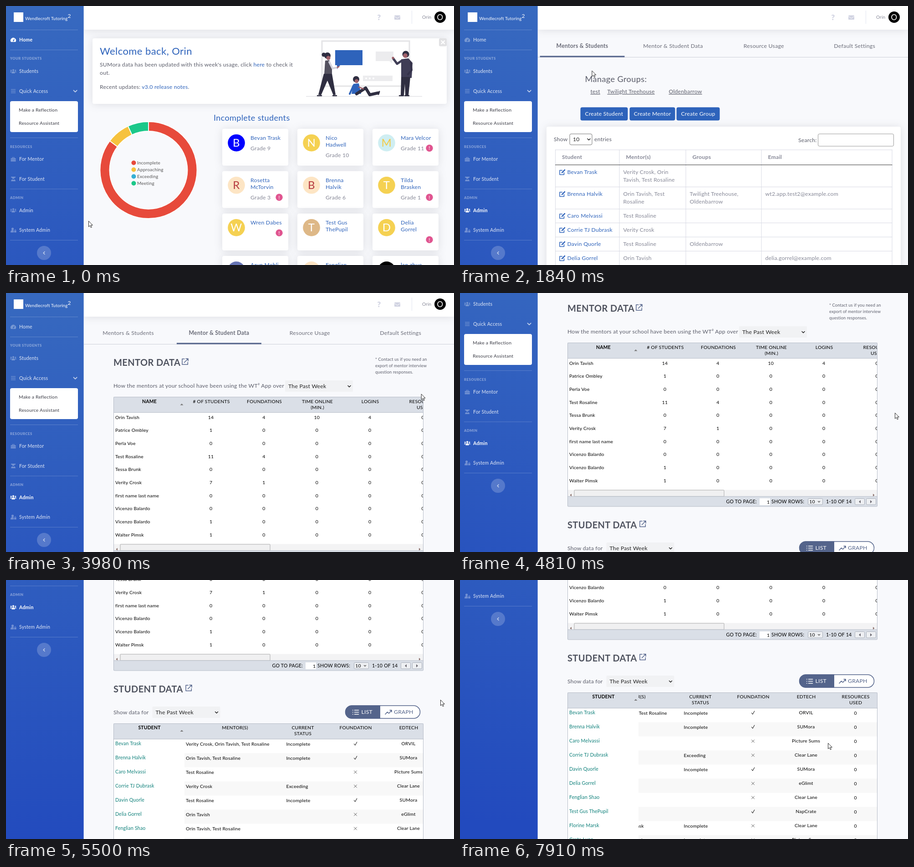
Write an HTML page that moves like this. It is 984 px wide and 569 px high and loops after 8000 ms.

```html
<!DOCTYPE html>
<html lang="en">
<head>
<meta charset="utf-8">
<title>Mentor dashboard</title>
<style>
html, body { margin: 0; width: 100%; height: 100%; overflow: hidden; background: #f8f9fc; }
svg { display: block; width: 984px; height: 569px; }
text { font-family: Lato, sans-serif; letter-spacing: .02em; white-space: pre; }
.mid { text-anchor: middle; }
.bold { font-weight: 700; }
.card { fill: #fff; filter: drop-shadow(0 1.5px 9px rgba(58, 59, 69, .14)); }
.head { font-weight: 900; letter-spacing: .07em; }
.nav text { opacity: .86; }
.nav g { opacity: .32; }
.nav.hot text, .nav.on text, .nav.on g { opacity: 1; }
.nav.on text { font-weight: 700; }
.line { fill: none; stroke-linecap: round; stroke-linejoin: round; }
.modal { fill: #fff; filter: drop-shadow(2px 2px 2px #334); }
.loading { font: 700 22.2px "Liberation Sans", Arial, sans-serif; letter-spacing: 0; }
</style>
</head>
<body>
<svg id="stage" viewBox="0 0 984 569"></svg>
<script>
const BLUE = '#2e63bb', GRAY = '#5a5c69', SOFT = '#858796', SLATE = '#54648b';
const $ = id => document.getElementById(id);
const list = (items, fn) => items.map(fn).join('');
const range = n => [...Array(n).keys()];

const txt = (x, y, s, size = 12.2, fill = GRAY, cls = '', more = '') =>
  `<text x="${x}" y="${y}" font-size="${size}" fill="${fill}" class="${cls}" ${more}>${s}</text>`;
const box = (x, y, w, h, fill, r = 0, more = '') =>
  `<rect x="${x}" y="${y}" width="${w}" height="${h}" fill="${fill}" rx="${r}" ${more}/>`;
const card = (x, y, w, h) => box(x, y, w, h, '#fff', 4, 'class="card"');
const dot = (x, y, r, fill) => `<circle cx="${x}" cy="${y}" r="${r}" fill="${fill}"/>`;
const path = (d, fill) => `<path d="${d}" fill="${fill}"/>`;
const line = (d, stroke, w = 1) => `<path class="line" d="${d}" stroke="${stroke}" stroke-width="${w}"/>`;
const at = (x, y, s) => `<g transform="translate(${x} ${y})">${s}</g>`;
const group = (id, s) => `<g id="${id}">${s}</g>`;

// sidebar
const PEOPLE = '<circle cy="-2.6" r="2.1"/><circle cx="-4.8" cy="-2" r="1.5"/><circle cx="4.8" cy="-2" r="1.5"/>' +
  '<path d="M-3.6 4.5V3a3.6 3 0 0 1 7.2 0v1.5zM-6.6 2.6v-1a2 2 0 0 1 3-1.3l-1 2.3zM6.6 2.6v-1a2 2 0 0 0-3-1.3l1 2.3z"/>';
const USER = '<circle cx="-1.5" cy="-2.8" r="2.6"/><path d="M-6 5V3.5a4 4 0 0 1 7-2.5V5z"/>';
const LOCK = '<path d="M2 1h4.6v4H2zM2.8 1v-1.6a1.5 1.5 0 0 1 3 0V1H5v-1.4a.7.7 0 0 0-1.4 0V1z"/>';
const NAV = [
  [74.5, 'Home', '<path fill-rule="evenodd" d="M-5 4.6A6 6 0 1 1 5 4.6zM-1.4 3h2.8L2.6-2.6 2-2.8z"/>'],
  [143.5, 'Students', PEOPLE],
  [187, 'Quick Access', '<path d="M-5-4.3H5v1.4H-5zM-5-.7H5V.7H-5zM-5 2.9H5v1.4H-5z"/>'],
  [336.5, 'For Mentor', '<path fill-rule="evenodd" d="M-5.5-2H-2.5v-2.6h5V-2h3v3h-11zM-1.3-2h2.6v-1.4h-2.6zM-5.5 1.8h11V5h-11z"/>'],
  [380, 'For Student', '<path d="M-5-5H5v2H2.8a2.8 2.8 0 0 1-5.6 0H-5zM-4.8 5V3.5a4 4 0 0 1 3-2.8L0 2.5 1.8.7a4 4 0 0 1 3 2.8V5z"/>'],
  [449, 'Admin', PEOPLE],
  [492.5, 'System Admin', USER + LOCK]
];
const sidebar = () =>
  box(0, 0, 170.6, 1100, 'url(#blue)') +
  box(17, 14, 21, 21, '#fff') +
  txt(42, 30.5, 'Wendlecroft Tutoring', 9.6, '#fff') + txt(135.5, 25.5, '2', 12, '#fff') +
  list([52.5, 96.5, 289.5, 402, 514.5], y => box(9, y - .5, 149, 1, 'rgba(255,255,255,.2)')) +
  list([[118, 'YOUR STUDENTS'], [311.7, 'RESOURCES'], [423.5, 'ADMIN']],
    ([y, s]) => txt(9, y, s, 7.6, 'rgba(255,255,255,.42)', 'head')) +
  list(NAV, ([y, s, icon], i) =>
    `<g class="nav" id="nav${i}" fill="#fff">${at(16, y, icon)}${txt(29, y + 3.6, s, 10.5, '#fff')}</g>`) +
  line('M148.5 185.3l3.6 3.6 3.6-3.6', '#c3d1ec', 1.8) +
  box(9, 209, 149, 68, '#fff', 4) +
  txt(28, 232, 'Make a Reflection', 10.4, '#3a3b45') + txt(28, 260.6, 'Resource Assistant', 10.4, '#3a3b45') +
  dot(83.5, 542.5, 15.5, 'rgba(255,255,255,.2)') + line('M85 539.7l-2.9 2.9 2.9 2.9', '#c3d1ec', 1.5);

// dx is the width the missing scrollbar gives back
const topbar = dx => box(171, 0, 813, 52, '#fff', 0, 'class="card"') + at(dx, 0,
  txt(819.5, 31, '?', 17, '#d1d3e2', 'mid', 'font-weight="900"') +
  box(853, 20.5, 13, 9.5, '#d1d3e2', 1.5) + line('M853.5 23l6 4 6-4', '#fff', 1) +
  box(891, 10, 1, 29, '#e3e6f0') + txt(914, 28.2, 'Orin', 10, SOFT) +
  dot(953.5, 24.5, 12.5, '#000') + txt(953.6, 30.6, 'O', 17, '#fff', 'mid'));

// home
const ring = (a, b, fill) => {
  const p = (r, deg) => {
    const q = deg * Math.PI / 180;
    return `${313 + r * Math.sin(q)} ${360.5 - r * Math.cos(q)}`;
  };
  const big = b - a > 180 ? 1 : 0;
  return `<path d="M${p(106.5, a)}A106.5 106.5 0 ${big} 1 ${p(106.5, b)}L${p(85.5, b)}A85.5 85.5 0 ${big} 0 ${p(85.5, a)}z" fill="${fill}" stroke="#fff" stroke-width="1.8"/>`;
};
const RED = '#e74a3b', YELLOW = '#f6c23e', GREEN = '#1cc88a';
const donut = () => ring(0, 307, RED) + ring(307, 335, YELLOW) + ring(335, 360, GREEN) +
  list([['Incomplete', RED], ['Approaching', YELLOW], ['Exceeding', '#36b0d5'], ['Meeting', GREEN]],
    ([s, c], i) => dot(280.5, 344.5 + 15 * i, 5, c) + txt(288, 348.2 + 15 * i, s, 10, '#555'));

const INK = '#2f2e41', SKIN = '#a0616a', PALE = '#ececee';
const drawing = () =>
  box(694, 77, 192, 99, 'none', 0, 'stroke="#e4e4e6" stroke-width="3"') +
  box(659, 198, 255, 1, '#d8d8dc') +
  path('M723 97h60v33h-49l-7 9v-9h-4z', BLUE) +
  path('M812 100h39v21h-3v5l-6-5h-30z', PALE) + box(784, 153, 65, 12, PALE) +
  list([791, 799, 807], x => dot(x, 159, 2, '#fff')) +
  dot(698, 107, 4.5, INK) + dot(706, 109, 7, INK) + dot(708, 114, 4.5, SKIN) +
  path('M701 120l9-1 6 13 0 18h-17z', '#53515f') + line('M710 123l7 14 11-2', '#d4d4de', 4) + line('M728 135l3-2', SKIN, 3) +
  path('M698 149h18l8 46-5 1-13-32-14 32-6-1z', INK) + line('M684 197h9M718 197h8', INK, 2.5) +
  dot(769, 161, 7, INK) + dot(770, 165, 4.3, SKIN) + path('M763 171l12-1 5 23h-21z', BLUE) + line('M763 175l-8 18', BLUE, 4) +
  line('M770 193l20-13 9 15 18-4', INK, 6.5) + line('M775 178l10 4', SKIN, 2.5) + line('M818 194l2-6', INK, 3) +
  dot(878, 106, 7.5, INK) + dot(877, 109, 5, SKIN) +
  path('M868 117l16-2 9 10-2 33h-23z', '#3f3d56') + line('M868 121l-9 6-8-11', '#3f3d56', 5) + dot(850, 114, 2.6, SKIN) +
  line('M889 124l2 17-8 9', '#34324a', 4) +
  path('M868 156h20l-4 40h-7l-1-25-2 25h-7z', INK) + line('M864 197h9M876 197h9', INK, 2.5);

const GOLD = '#f5d152', CREAM = '#fde5c4', BRICK = '#b63a40';
const PUPILS = [
  ['Bevan Trask', '', 'Grade 9', 0, '#00f', '#fff'],
  ['Nico', 'Hadwell', 'Grade 10', 0, GOLD, '#fff'],
  ['Mara Velcor', '', 'Grade 11', 1, '#cfeef2', '#f2cb4a'],
  ['Rosetta', 'McTorvin', 'Grade 3', 1, CREAM, BRICK],
  ['Brenna', 'Halvik', 'Grade 6', 0, CREAM, BRICK],
  ['Tilda', 'Brasken', 'Grade 1', 1, GOLD, '#fff'],
  ['Wren Dabes', '', '', 1, GOLD, '#fff'],
  ['Test Gus', 'ThePupil', '', 0, '#deb887', '#fff'],
  ['Delia', 'Gorrel', '', 1, GOLD, '#fff'],
  ['Arun Mehli', '', '', 0, '#6674b4', '#fff'],
  ['Fenglian', 'Shao', '', 0, CREAM, BRICK],
  ['lan zhuo', '', '', 0, '#000', '#fff']
];
const pupil = ([a, b, grade, alert, fill, ink], i) => {
  const drop = b ? 15 : 0;
  return at(475 + 165 * (i % 3), 269.7 + 93.1 * Math.floor(i / 3),
    card(0, 0, 145, 81) + dot(31, 31, 18.8, fill) + txt(31, 39.3, a[0], 24, ink, 'mid') +
    txt(62, 24.4, a, 12.2, BLUE) + txt(62, 39.2, b, 12.2, BLUE) + txt(62, 47.6 + drop, grade, 12.2, SOFT) +
    (alert ? dot(125, 42.5 + drop, 7.7, '#e05590') + txt(125.1, 46.8 + drop, '!', 12, '#fff', 'mid') : ''));
};
const home = () => card(190, 71, 778, 144) +
  txt(206, 107.4, 'Welcome back, Orin', 22, BLUE) +
  txt(206, 132.7, `SUMora data has been updated with this week's usage, click <tspan fill="${BLUE}">here</tspan> to check it`) +
  txt(206, 151.2, 'out.') + txt(206, 182.3, `Recent updates: <tspan fill="${BLUE}">v3.0 release notes</tspan>.`) +
  box(951, 71, 17, 17.5, '#e2e2e4', 3) + line('M956.5 76.5l6.5 6.5m0-6.5l-6.5 6.5', '#fff', 2.4) +
  drawing() + donut() + txt(456, 251.8, 'Incomplete students', 18, BLUE) + list(PUPILS, pupil) + topbar(0);

// admin
const tabs = (x, step, active) => box(171, 112, 813, 1, '#cdd0d9') +
  list(['Mentors & Students', 'Mentor & Student Data', 'Resource Usage', 'Default Settings'], (s, i) =>
    txt(x + step * i, 91.6, s, 12.3, '#6a6c78', 'mid ' + (i === active ? 'bold' : '')) +
    (i === active ? box(x + step * i - 93, 109.5, 186, 3, SLATE) : ''));

const groups = dx => at(dx, 0, txt(274.5, 167.4, 'Manage Groups:', 18.2) +
  list([[286.5, 'test'], [323.5, 'Twilight Treehouse'], [458.5, 'Oldenbarrow']],
    ([x, s]) => txt(x, 192.2, s, 12.2, GRAY, '', 'text-decoration="underline"')) +
  list([[264.5, 104, 'Create Student'], [372.5, 100, 'Create Mentor'], [475.5, 95, 'Create Group']],
    ([x, w, s]) => box(x, 222.5, w, 29, BLUE, 4) + txt(x + w / 2, 241.2, s, 12.2, '#fff', 'mid')));

const chevron = (x, y) => line(`M${x - 3} ${y - 1.5}l3 3 3-3`, '#222', 1.5);
const COLS = [209.5, 350, 496, 662, 949];
const PEOPLE_ROWS = [
  [365, 'Bevan Trask', ['Verity Crosk, Orin', 'Tavish, Test Rosaline'], [], ''],
  [413, 'Brenna Halvik', ['Orin Tavish, Test', 'Rosaline'], ['Twilight Treehouse,', 'Oldenbarrow'], 'wt2.app.test2@example.com'],
  [461, 'Caro Melvassi', ['Test Rosaline'], [], ''],
  [492, 'Corrie TJ Dubrask', ['Verity Crosk'], [], ''],
  [523, 'Davin Quorle', ['Test Rosaline'], ['Oldenbarrow'], ''],
  [554, 'Delia Gorrel', ['Orin Tavish'], [], 'delia.gorrel@example.com']
];
const edit = y => line(`M228.5 ${y + 1}v4.5h-9.5v-9.5h5.5`, BLUE, 1.5) + line(`M224 ${y + 1.2}l6-6`, BLUE, 2.6);
const peopleTable = () =>
  txt(206, 297.2, 'Show') + box(241, 281, 49, 24, '#fff', 3, 'stroke="#777"') + txt(248, 297.4, '10', 12.2, '#222') +
  chevron(283, 293) + txt(295, 297.2, 'entries') + txt(743, 298.8, 'Search:') +
  box(786.5, 281, 166, 27, '#fff', 3, 'stroke="#999"') +
  line(list(COLS, x => `M${x} 316V569`) + list([316, 397.5, 446, 476.5, 507.5, 538.5], y => `M209.5 ${y}H949`), '#d8dae4') +
  line('M209.5 349H949', '#333', 1.2) +
  list(['Student', 'Mentor(s)', 'Groups', 'Email'], (s, i) => txt(COLS[i] + 14.5, 336.4, s, 12.2, SOFT, 'bold')) +
  list(PEOPLE_ROWS, ([y, name, mentors, teams, mail]) => edit(y) + txt(235.5, y + 4.2, name, 12.2, BLUE) +
    list(mentors, (s, i) => txt(358.5, y + 4.2 + 17 * i, s, 12.2, SOFT)) +
    list(teams, (s, i) => txt(504.5, y + 4.2 + 17 * i, s, 12.2, SOFT)) + txt(670.5, y + 4.2, mail, 12.2, SOFT));

const blank = () => tabs(270.5, 202.5, -1) + groups(1.5) + card(190, 265, 792, 32) + topbar(13);
const people = () => tabs(268.5, 199.4, 0) + groups(0) + card(190, 265, 778, 340) + peopleTable() + topbar(0);

// data page, in page coordinates
const BAR = '#dadfe7', EDGE = '#b7bdc8', BLACK = '#000';
const cell = (x, y, s, cls = 'mid') => txt(x, y, s, 10.4, BLACK, cls);
const title = (y, s, x) => txt(236, y, s, 20, '#4e525e', 'bold') +
  line(`M${x + 6} ${y - 15.3}h-5v12.3h12.3v-5M${x + 9} ${y - 15.800}h5v5M${x + 13.5} ${y - 15.3}l-8 8`, SLATE, 1.5);
const period = (x, y) => box(x, y, 149, 25, '#f1f2f4', 2) + txt(x + 7, y + 16.6, 'The Past Week', 12.2, '#222') + chevron(x + 141, y + 13);
const heads = (y, items) => list(items, ([x, a, b]) => cell(x, y, a) + (b ? cell(x, y + 13, b) : ''));
const sorted = (y, s) => cell(315, y, s, 'mid bold') + path(`M382.5 ${y + 5}l3.5-3.5 3.5 3.5z`, '#777');

const MENTORS = [
  ['Orin Tavish', 14, 4, 10, 4], ['Patrice Ombley', 1, 0], ['Perla Voe', 0, 0], ['Test Rosaline', 11, 4],
  ['Tessa Brunk', 0, 0], ['Verity Crosk', 7, 1], ['first name last name', 0, 0],
  ['Vicenzo Balardo', 0, 0], ['Vicenzo Balardo', 1, 0], ['Walter Pimsk', 1, 0]
];
const button = (x, y, w) => box(x, y, w, 13.5, '#eef0f3', 2, 'stroke="#a9afba"');
const mentorTable = () => '<g clip-path="url(#grid1)">' + box(236, 228, 681, 360, '#fff') + box(236, 228, 681, 34.5, BAR) +
  line('M236 262.5H917', EDGE) + sorted(241.5, 'NAME') +
  heads(241.5, [[451, '# OF STUDENTS'], [567.5, 'FOUNDATIONS'], [684, 'TIME ONLINE', '(MIN.)'], [800, 'LOGINS'], [916, 'RESOURCES', 'USED']]) +
  list(MENTORS, ([name, ...v], i) => {
    const y = 276.5 + 28.7 * i;
    return cell(240, y, name, '') + list(range(5), k => cell(450 + 116.4 * k, y, v[k] || 0));
  }) +
  box(236, 551.5, 681, 15, '#f3f3f4') + box(251, 552, 329, 14, '#f0f0f1', 1, 'stroke="#aaa"') +
  path('M245 560v6l-3.5-3zM907 560v6l3.5-3z', '#8a6f6a') +
  box(236, 566, 681, 22, BAR) + line('M236 566H917', EDGE) +
  txt(584.5, 581.3, 'GO TO PAGE:', 10.6, BLACK) + box(658, 570, 23, 15, '#fff') + cell(677, 581.6, '1') +
  txt(684, 581.3, 'SHOW ROWS:', 10.6, BLACK) + button(764.5, 570.5, 32) + cell(773.5, 581.3, '10') +
  path('M785 576h7l-3.5 4z', '#888') + txt(804, 581.3, '1-10 OF 14', 10.6, BLACK) +
  button(867.5, 570.5, 21) + button(892.5, 570.5, 21) + path('M880 574v7l-4-3.5zM901 574v7l4-3.5z', '#6d6a72') +
  '</g>' + box(236.5, 228.5, 680, 359.5, 'none', 2, `stroke="${EDGE}"`);

const ORIN = 'Orin Tavish', ROSA = 'Test Rosaline', INC = 'Incomplete';
const STUDENTS = [
  ['Bevan Trask', `Verity Crosk, ${ORIN}, ${ROSA}`, INC, 1, 'ORVIL'],
  ['Brenna Halvik', `${ORIN}, ${ROSA}`, INC, 1, 'SUMora'],
  ['Caro Melvassi', ROSA, '', 0, 'Picture Sums'],
  ['Corrie TJ Dubrask', 'Verity Crosk', 'Exceeding', 0, 'Clear Lane'],
  ['Davin Quorle', ROSA, INC, 1, 'SUMora'],
  ['Delia Gorrel', ORIN, '', 0, 'eGlimt'],
  ['Fenglian Shao', `${ORIN}, ${ROSA}`, '', 0, 'Clear Lane'],
  ['Test Gus ThePupil', ORIN, '', 1, 'NapCrate'],
  ['Florine Marsk', `${ROSA} , Walter Pimsk`, INC, 0, 'Clear Lane'],
  ['Greta Lunn', `${ROSA} , Walter Pimsk`, INC, 0, 'Picture Sums']
];
const tick = y => line(`M764.5 ${y - 3.5}l2.3 3 4-7`, '#222', 1.1);
const cross = y => line(`M764.5 ${y - 6.5}l6 6m0-6l-6 6`, '#333', .8);
const studentTable = () => box(236, 704, 681, 400, '#fff') + box(236, 704, 681, 34.5, BAR) + line('M236 738.5H917', EDGE) +
  list(STUDENTS, ([name], i) => (i % 2 ? box(392, 738.5 + 31 * i, 525, 31, '#f8f8f8') : '') +
    txt(240, 751.5 + 31 * i, name, 10.5, '#0c7f79')) +
  sorted(717, 'STUDENT') +
  '<g clip-path="url(#grid2)">' + group('cols',
    heads(717, [[503, 'MENTOR(S)'], [652, 'CURRENT', 'STATUS'], [768, 'FOUNDATION'], [884.5, 'EDTECH'], [993, 'RESOURCES', 'USED']]) +
    list(STUDENTS, ([, who, status, ok, tool], i) => {
      const y = 752.5 + 31 * i;
      return cell(395, y, who, '') + cell(615.5, y, status, '') + cell(884, y - .5, tool) + cell(992.5, y, '0') +
        (ok ? tick(y) : cross(y));
    })) + '</g>' +
  group('hover', line('M833.5 704V738', EDGE) + path('M835.5 720.5h8l-4 4z', '#777')) +
  box(236.5, 704.5, 680, 420, 'none', 2, `stroke="${EDGE}"`);

const toggle = () => box(745.5, 665, 164, 28, '#fff', 14, `stroke="${SLATE}" stroke-width="1.5"`) +
  path('M822 664.5v29H759.5a14.5 14.5 0 0 1 0-29z', SLATE) +
  line('M761.5 675h.5M761.5 679.5h.5M761.5 684h.5M765.5 675h9M765.5 679.5h9M765.5 684h9', '#fff', 1.6) +
  txt(780.5, 683.3, 'LIST', 12.2, '#fff') + line('M833 684l4.5-5 3.5 3 6-7m-4 0h4v4', SLATE, 1.5) +
  txt(852, 683.3, 'GRAPH', 12.2, SLATE);

const data = () => tabs(268.5, 199.4, 1) + title(160, 'MENTOR DATA', 386) +
  list(['* Contact us if you need an', 'export of mentor interview', 'question responses.'], (s, i) => txt(811, 149 + 14 * i, s, 9.2)) +
  txt(236, 208.3, 'How the mentors at your school have been using the WT² App over') + period(613, 192) + mentorTable() +
  title(635.5, 'STUDENT DATA', 394) + txt(236, 683.5, 'Show data for') + period(321.5, 667) + toggle() + studentTable() + topbar(0);

const spinner = () => list(range(20), i =>
  `<rect x="-1.6" y="-25" width="3.2" height="13.5" fill="${i < 3 || i > 17 ? '#cbd8ec' : '#5a89c6'}" transform="rotate(${18 * i})"/>`);

$('stage').innerHTML =
  `<defs><linearGradient id="blue" x2="0" y2="1"><stop stop-color="#3769bf"/><stop offset=".9" stop-color="#224abe"/></linearGradient>
  <clipPath id="grid1"><path d="M236 228h681v360H236z"/></clipPath>
  <clipPath id="grid2"><path d="M392 704h525v400H392z"/></clipPath></defs>` +
  box(0, 0, 984, 569, '#f8f9fc') +
  group('page', group('home', home()) + group('blank', blank()) + group('people', people()) + group('data', data()) + sidebar()) +
  group('busy', box(0, 0, 984, 569, 'rgba(120,120,122,.27)') + group('modal',
    box(-83.5, 259.5, 167, 147, '#fff', 5, 'class="modal"') +
    '<text class="loading mid" y="307.5" fill="#222">Loading...</text>' +
    at(0, 357.5, group('spin', spinner())))) +
  group('cursor', '<path d="M.5.5v12.5l2.9-2.7 2 4.5 2-.9-2-4.4h3.9z" fill="#fff" stroke="#111" stroke-width=".9"/>');

// piecewise linear track of [time, value...] points
const track = (t, pts) => {
  const i = pts.findIndex(p => p[0] > t);
  if (i < 0) return pts[pts.length - 1].slice(1);
  if (!i) return pts[0].slice(1);
  const a = pts[i - 1], b = pts[i], k = (t - a[0]) / (b[0] - a[0]);
  return a.slice(1).map((v, j) => v + (b[j + 1] - v) * k);
};
const POINTER = [
  [30, 181, 472], [200, 118, 466], [370, 71, 453], [540, 71, 453], [570, 77, 448], [1200, 77, 448], [1400, 110, 405],
  [1840, 289, 142], [2050, 380, 106], [2260, 435, 91], [3240, 435, 91], [3290, 455, 101], [3500, 560, 125],
  [3900, 880, 212], [4140, 974, 240], [4240, 988, 252], [4390, 988, 258], [4600, 958, 262], [4810, 955, 263],
  [5180, 954, 263], [6010, 954, 263], [6300, 915, 236], [6850, 822, 270], [7010, 821, 282], [7080, 820, 286],
  [7400, 808, 358]
];
const SCROLL = [[4340, 0], [4810, 119], [5180, 255], [5500, 389], [5680, 440], [5860, 457]];
const SLIDE = [[7080, 0], [7300, 40], [7700, 114], [7910, 124]];

const show = (id, on) => { $(id).style.display = on ? '' : 'none'; };
const move = (id, x, y) => $(id).setAttribute('transform', `translate(${x} ${y})`);
const mark = (i, cls, on) => $('nav' + i).classList.toggle(cls, on);

function render(t) {
  const first = t >= 1070 && t < 1740, second = t >= 2510 && t < 3240;
  show('home', t < 1070);
  show('blank', first);
  show('people', t >= 1740 && t < 3240);
  show('data', t >= 3240);
  show('busy', first || second);
  show('hover', t >= 6880 && t < 7080);
  mark(0, 'on', t < 1070);
  mark(5, 'on', t >= 1740);
  mark(5, 'hot', t >= 280 && t < 1070);
  mark(6, 'hot', t >= 90 && t < 280);
  move('page', 0, -Math.round(track(t, SCROLL)[0]));
  move('cols', -Math.round(track(t, SLIDE)[0]), 0);
  move('cursor', ...track(t, POINTER));
  move('modal', first ? 499 : 492, 0);
  $('spin').setAttribute('transform', `rotate(${Math.round((262 + (t - 1070) * .3164) / 18) * 18})`);
}
const start = performance.now();
(function frame() {
  render((performance.now() - start) % 8000);
  requestAnimationFrame(frame);
})();
</script>
</body>
</html>
```
